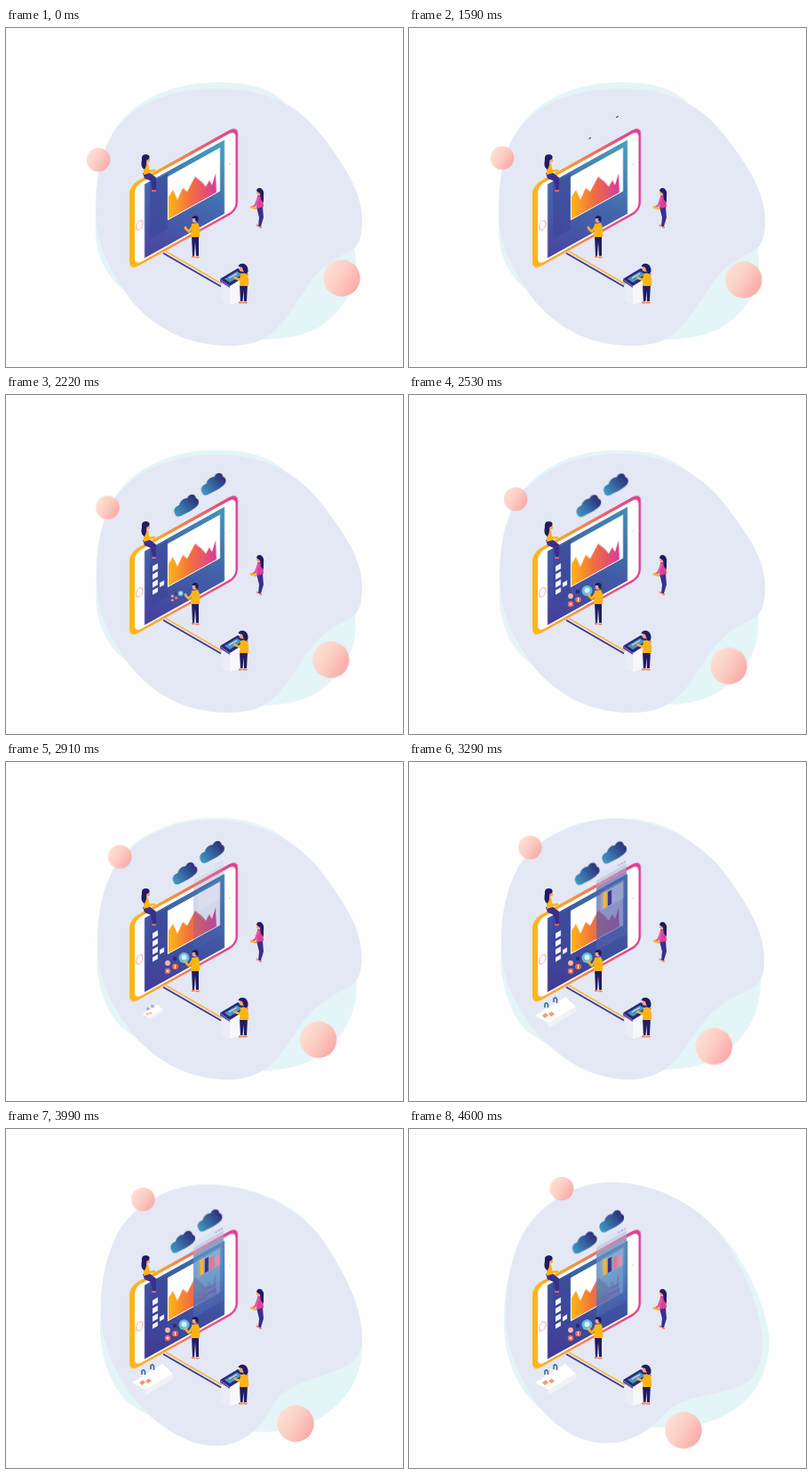
Recreate the animation shown at these times as an HTML page without scripts. Size 447x381 px, loop 4680 ms.

```html
<!DOCTYPE html>
<html lang="en">
<head>
<meta charset="utf-8">
<title>Isometric dashboard</title>
<style>
html, body { margin: 0; width: 100%; height: 100%; overflow: hidden; background: #fefefe; }
svg { display: block; width: 447px; height: 381px; }

/* Everything holds for 1590 ms, then moves in even steps of about 77 ms. */
.anim, .pop { animation: 4680ms step-end infinite; }
.pop { transform-box: fill-box; transform-origin: center; }
.tint { animation-name: tint; }
.back { animation-name: back; }
.blob { animation-name: blob; }
.ball-s { animation-name: ball-s; }
.ball-l { animation-name: ball-l; }
.drift { animation-name: drift; }
.puff { animation-name: puff; }
.items { animation-name: items; }
.icons { animation-name: icons; }
.box { animation-name: box; }
.panel { animation-name: panel; }
.glow { animation-name: glow; }
.bars1 { animation-name: bars1; transform-origin: bottom; }
.bars2 { animation-name: bars2; transform-origin: bottom; }

@keyframes blob {
  0%, 33.97% { d: path("M101 205C101 175 104 148 118 122C140 84 190 68 237 68C280 68 318 78 348 112C380 150 401 185 401 215C401 240 395 248 385 252C345 272 345 285 326 310C303 347 285 357 252 357C200 357 165 335 140 305C112 265 101 240 101 205Z"); animation-timing-function: steps(12); }
  54.06% { d: path("M102 203C102 170 107 145 120 120C143 84 190 66 235 66C279 66 320 81 350 116C382 156 401 185 401 215C401 238 396 246 386 252C345 272 340 290 322 315C303 345 285 357 250 357C200 357 165 335 140 305C112 265 102 240 102 203Z"); animation-timing-function: steps(10); }
  70.3% { d: path("M104 200C104 170 110 140 124 117C150 80 195 64 233 64C275 64 321 84 351 119C383 162 400 190 400 222C400 240 396 250 384 256C340 274 332 292 315 315C298 345 275 357 245 357C200 355 165 330 140 300C114 265 104 240 104 200Z"); animation-timing-function: steps(9); }
  85.26% { d: path("M107 198C107 170 113 142 126 117C148 80 190 63 226 63C275 63 322 85 350 116C382 160 401 200 401 234C401 250 396 258 384 266C350 282 322 284 304 305C285 340 265 356 237 356C200 356 165 330 140 298C118 265 107 240 107 198Z"); animation-timing-function: steps(8); }
  98.29%, 100% { d: path("M109 208C109 180 114 145 129 118C150 82 188 60 228 60C275 60 318 82 346 113C376 152 387 185 391 200C400 232 404 262 383 283C350 303 315 295 290 318C270 340 250 353 222 353C190 353 165 335 143 308C120 270 109 245 109 208Z"); }
}
@keyframes back {
  0%, 33.97% { d: path("M101 235C100 180 105 145 118 122C140 80 190 61 237 61C270 61 292 66 310 80C352 122 385 200 392 247C400 285 385 315 350 338C330 347 310 350 288 350C220 352 150 310 125 288C110 272 103 255 101 235Z"); animation-timing-function: steps(12); }
  54.06% { d: path("M102 235C101 180 107 145 120 120C143 79 190 62 235 62C268 62 292 68 312 84C354 124 388 200 393 247C397 285 378 315 345 336C328 345 308 348 288 348C220 350 150 315 127 293C111 277 104 255 102 235Z"); animation-timing-function: steps(10); }
  70.3% { d: path("M104 235C102 180 109 143 124 116C148 80 195 63 233 63C268 63 296 72 318 90C360 130 390 200 396 245C396 285 378 315 342 335C322 344 300 346 280 346C220 348 155 322 130 300C114 282 106 255 104 235Z"); animation-timing-function: steps(9); }
  85.26% { d: path("M106 232C105 180 112 145 126 116C148 79 190 62 226 62C272 62 312 80 335 100C370 138 396 200 401 240C403 285 375 318 335 334C312 341 292 341 272 340C220 345 158 328 133 303C117 285 108 258 106 232Z"); animation-timing-function: steps(8); }
  98.29%, 100% { d: path("M107 225C106 185 114 145 128 117C150 81 188 60 228 60C272 60 318 82 346 112C382 150 402 200 406 238C404 290 375 320 328 332C305 336 285 336 262 335C220 348 160 330 138 305C120 285 109 258 107 225Z"); }
}
@keyframes ball-s {
  0% { transform: translate(104px, 148px); }
  33.97% { transform: translate(105px, 146px); animation-timing-function: steps(4); }
  40.6% { transform: translate(109px, 136px); animation-timing-function: steps(8); }
  54.06% { transform: translate(120px, 117px); animation-timing-function: steps(10); }
  70.3% { transform: translate(136.3px, 96px); animation-timing-function: steps(9); }
  85.26% { transform: translate(154.3px, 79px); animation-timing-function: steps(8); }
  98.29%, 100% { transform: translate(172px, 67px); }
}
@keyframes ball-l {
  0% { transform: translate(378px, 281px); }
  33.97% { transform: translate(376.7px, 283px); animation-timing-function: steps(4); }
  40.6% { transform: translate(371.5px, 290.5px); animation-timing-function: steps(8); }
  54.06% { transform: translate(360px, 304.5px); animation-timing-function: steps(10); }
  70.3% { transform: translate(343.3px, 319.5px); animation-timing-function: steps(9); }
  85.26% { transform: translate(326px, 331px); animation-timing-function: steps(8); }
  98.29%, 100% { transform: translate(309px, 338.5px); }
}
@keyframes drift {
  0%, 40.6% { transform: none; animation-timing-function: steps(35); }
  98.29%, 100% { transform: translate(-6px, 4px); }
}
@keyframes puff {
  0% { opacity: 0; transform: scale(.1); }
  33.97% { opacity: 1; transform: scale(.1); animation-timing-function: steps(4); }
  40.6%, 100% { opacity: 1; transform: none; }
}
@keyframes items {
  0%, 35.6% { transform: scale(0); animation-timing-function: steps(3); }
  40.6% { transform: scale(.38); animation-timing-function: steps(4); }
  47.2%, 100% { transform: none; }
}
@keyframes icons {
  0%, 42.2% { transform: scale(0); animation-timing-function: steps(6); }
  52.1%, 100% { transform: none; }
}
@keyframes box {
  0%, 57.1% { transform: scale(0); animation-timing-function: steps(6); }
  67%, 100% { transform: none; }
}
@keyframes panel {
  0%, 57.1% { opacity: 0; animation-timing-function: steps(8); }
  70.3%, 100% { opacity: 1; }
}
@keyframes glow {
  0%, 70.3% { opacity: 0; animation-timing-function: steps(8); }
  83.5%, 100% { opacity: 1; }
}
@keyframes tint {
  0%, 33.97% { opacity: 0; animation-timing-function: steps(22); }
  70.3%, 100% { opacity: .3; }
}
@keyframes bars1 {
  0%, 63.7% { transform: scaleY(0); animation-timing-function: steps(4); }
  70.3%, 100% { transform: none; }
}
@keyframes bars2 {
  0%, 72% { transform: scaleY(0); animation-timing-function: steps(6); }
  82%, 100% { transform: none; }
}

.navy { fill: #211b63; }
.trousers { fill: #3b2f8c; }
.yellow { fill: #fcb414; }
.pink { fill: #dd3f9b; }
.skin { fill: #f6a27c; }
.limb { fill: none; stroke-width: 2.6; stroke-linecap: round; stroke-linejoin: round; }
</style>
</head>
<body>
<svg viewBox="0 0 447 381">
  <defs>
    <linearGradient id="frame">
      <stop offset="0" stop-color="#fdb714"/><stop offset=".3" stop-color="#f9a032"/>
      <stop offset=".75" stop-color="#e9557c"/><stop offset="1" stop-color="#de3b94"/>
    </linearGradient>
    <linearGradient id="screen" x1="0" y1="1" x2="1" y2="0">
      <stop offset="0" stop-color="#4a429f"/><stop offset=".5" stop-color="#4368ae"/>
      <stop offset="1" stop-color="#45a5bd"/>
    </linearGradient>
    <linearGradient id="hills">
      <stop offset="0" stop-color="#fdb515"/><stop offset=".45" stop-color="#f2703f"/>
      <stop offset="1" stop-color="#d93a98"/>
    </linearGradient>
    <linearGradient id="glass" x1="0" y1="0" x2="0" y2="1">
      <stop offset="0" stop-color="#7fc3dc" stop-opacity=".35"/>
      <stop offset=".6" stop-color="#4f9cc6" stop-opacity=".55"/>
      <stop offset="1" stop-color="#4260b0" stop-opacity=".3"/>
    </linearGradient>
    <linearGradient id="sky" x1="0" y1="1" x2="1" y2=".2">
      <stop offset="0" stop-color="#41a3c4"/><stop offset=".45" stop-color="#376da7"/>
      <stop offset="1" stop-color="#2c2b75"/>
    </linearGradient>
    <linearGradient id="peach" x1="0" y1=".1" x2="1" y2=".7">
      <stop offset="0" stop-color="#fee4d8"/><stop offset=".5" stop-color="#fccfc4"/>
      <stop offset="1" stop-color="#f9a8a7"/>
    </linearGradient>
    <path id="cloud" d="M-13 9C-15 5-12 1-8 0C-7-5-3-8 1-8C3-13 10-14 11-8C15-7 15-2 12 1C8 5 0 9-6 12C-10 14-12 12-13 9Z"/>
  </defs>

  <path class="anim back" fill="#e4f5f8"/>
  <path class="anim blob" fill="#e4e8f4"/>
  <circle class="anim ball-s" r="13.3" fill="url(#peach)"/>
  <circle class="anim ball-l" r="20.7" fill="url(#peach)"/>

  <!-- cable -->
  <path d="M177 253L242 290.500" stroke="#39378c" stroke-width="1.800"/>
  <path d="M180 251L243 287.500" stroke="#f8b84a" stroke-width="1.800"/>

  <g class="anim drift" fill="url(#sky)">
    <g transform="translate(203.5 123.5)"><use class="pop puff" href="#cloud"/></g>
    <g transform="translate(234 99.5)"><use class="pop puff" href="#cloud"/></g>
  </g>

  <!-- phone -->
  <g transform="translate(139 177) skewY(-29)">
    <rect width="122" height="96" rx="9" fill="url(#frame)"/>
    <rect x="6" y="4" width="113.500" height="89" rx="7" fill="#fff"/>
    <ellipse cx="11.2" cy="51" rx="3.7" ry="5" fill="#fff" stroke="#f3a9a0"/>
    <circle cx="113" cy="39" r="1" fill="#d5d6e2"/>
    <rect x="17" y="8" width="90" height="83" fill="url(#screen)"/>
    <rect class="anim tint" x="17" y="8" width="90" height="83" fill="#30227f"/>
    <rect x="23" y="10" width="20" height="63" fill="#3c4698" opacity=".65"/>
    <rect x="43" y="14" width="59" height="49" fill="#fff"/>
    <path d="M44 62V37L49 32L54 46L60 36L65 43L74 31L82 42L86 49L90 44L93 51L97 40L98 62Z" fill="url(#hills)"/>
    <g class="pop items" fill="#f5f6fc">
      <rect x="26" y="30" width="6" height="6"/>
      <rect x="26" y="39" width="6" height="6"/>
      <rect x="26" y="48" width="6" height="6"/>
      <rect x="26" y="57" width="6" height="5"/>
      <rect x="34" y="53" width="5" height="5"/>
    </g>
    <g class="anim panel">
      <rect x="72" y="4" width="34" height="71" fill="#5260ad" opacity=".68"/>
      <rect x="72" y="-10" width="34" height="14" fill="#a9b6dc" opacity=".5"/>
      <rect x="72" y="-10" width="34" height="6" fill="#e9ecf6" opacity=".7"/>
      <path d="M97-7h1.5m1.5 0h1.5m1.5 0h1.5" stroke="#5c6b9f"/>
      <rect x="77" y="12" width="26" height="21" fill="#cfd4ea" opacity=".25"/>
    </g>
    <rect class="anim glow" x="72" y="4" width="34" height="71" fill="url(#glass)"/>
    <g class="pop bars1">
      <path d="M79.500 14h4v18h-4z" fill="#fdb719"/>
      <path d="M85 16h4v16h-4z" fill="#3a2e8c"/>
    </g>
    <g class="pop bars2">
      <path d="M91 18h4v14h-4z" fill="#e8777e"/>
      <path d="M96.500 20h4.500v12h-4.500z" fill="#e88ba8"/>
      <path d="M86 48h14M86 54h14M86 60h10" stroke="#7fa0d4" stroke-width="1" opacity=".7"/>
    </g>
  </g>

  <g class="pop icons">
    <circle cx="182" cy="226" r="2.9" fill="#f6b9a5"/>
    <circle cx="182" cy="235" r="3.2" fill="#ef6d62"/>
    <circle cx="182" cy="235" r="1.2" fill="#fff"/>
    <circle cx="190" cy="221" r="2.3" fill="#2c2a78"/>
    <circle cx="190.500" cy="230" r="3.3" fill="#f0703d"/>
    <path d="M190.500 228v4" stroke="#fff"/>
    <circle cx="200.500" cy="220" r="6" fill="#65bfd8"/>
    <circle cx="200.500" cy="219.500" r="3" fill="#d6f0f6"/>
  </g>

  <!-- calendar -->
  <g class="pop box">
    <path d="M142 285L176 264L188 275V281L157 299L142 291Z" fill="#e6e8f2"/>
    <path d="M142 285L176 264L188 275L157 293Z" fill="#fff"/>
    <path d="M157 293L188 275V281L157 299Z" fill="#f1f2f8"/>
    <path d="M150 285l4-3 3 3-4 3zM157 283l4-2.500 3 3-4 2.500z" fill="#f49a6e"/>
    <path d="M153 276v-4q2-3 3.500 1v3M163 270v-4q2-3 3.500 1v4" fill="none" stroke="#2f62a6" stroke-width="1.5"/>
  </g>

  <!-- seated woman -->
  <g>
    <path class="limb" d="M159 166L167 169L167 182" stroke="#3b2f8c" stroke-width="4"/>
    <path class="trousers" d="M154 163L161 162L169 168L169 181H165L163 172L156 169Z"/>
    <path class="yellow" d="M155 153L160 152L162 163L155 165Z"/>
    <path class="limb" d="M158 156L161 161L167 160" stroke="#fcb414"/>
    <circle class="skin" cx="159.500" cy="148.500" r="2.7"/>
    <path class="navy" d="M153 148Q152 142 158 142Q163 143 161 147L158 149Q159 154 156 159Q151 157 153 148Z"/>
    <path d="M164 183h5" stroke="#e35f78" stroke-width="2"/>
  </g>

  <!-- standing woman -->
  <g>
    <path class="trousers" d="M282 201H289L290 213L287 223H284L285 213Z"/>
    <path class="pink" d="M283 188L289 187L290 201L282 203Z"/>
    <path class="limb" d="M284 191L281 199L278 201" stroke="#e05aa0"/>
    <path d="M275 201L282 203" stroke="#fbb32c" stroke-width="2.500"/>
    <circle class="skin" cx="284.500" cy="185" r="2.500"/>
    <path class="navy" d="M282 183Q283 179 287 180Q291 182 290 190L290 196L287 193L286 186Z"/>
    <path d="M282 221l2 2M285 224h3" stroke="#ef8f75" stroke-width="1.800"/>
  </g>

  <!-- man at the screen -->
  <g>
    <path class="navy" d="M209 233H217L217 256H214L213 240L212 256H210Z"/>
    <path class="yellow" d="M209 220L216 219Q219 223 218 235H208Z"/>
    <path class="limb" d="M210 223L206 229L202 225" stroke="#fcb414"/>
    <circle class="skin" cx="202" cy="224" r="1.300"/>
    <circle class="skin" cx="212.500" cy="216" r="2.800"/>
    <path class="navy" d="M209.500 214Q210 210.500 214 211Q218 212 216 218L213.500 217L213 214Z"/>
    <path d="M209 257h3.500M213.500 257.500h4" stroke="#f0824f" stroke-width="1.800"/>
  </g>

  <!-- console -->
  <path d="M243 286L263 282V308L252 311L243 306Z" fill="#f7f7fb"/>
  <path d="M243 286L252 291V311L243 306Z" fill="#ebecf4"/>
  <path d="M241 282L261 270L273 277L252 290Z" fill="#2b2878"/>
  <path d="M241 282L252 290V292L241 285Z" fill="#5a50aa"/>
  <path d="M246 282L260 273.500L266 277L252 286Z" fill="#4c97be"/>
  <path d="M251 281L260 276" stroke="#c9e3f0" stroke-width="1.300"/>

  <!-- operator -->
  <g>
    <path class="navy" d="M263 288H272L271 307H268L267.500 295L266.500 307H264Z"/>
    <path class="yellow" d="M264 276L271 275Q274 281 273 290H263Z"/>
    <path class="limb" d="M266 279L263 283L258 281" stroke="#fcb414"/>
    <circle class="skin" cx="257.500" cy="280.500" r="1.300"/>
    <circle class="skin" cx="265.500" cy="271" r="2.800"/>
    <path class="navy" d="M261.500 268Q263 264 268 265Q273 267 272.500 274Q271 278 268 275L266 269Z"/>
    <path d="M262 308.500h4.500M267 308.500h4.500" stroke="#f0824f" stroke-width="2"/>
  </g>
</svg>
</body>
</html>
```
